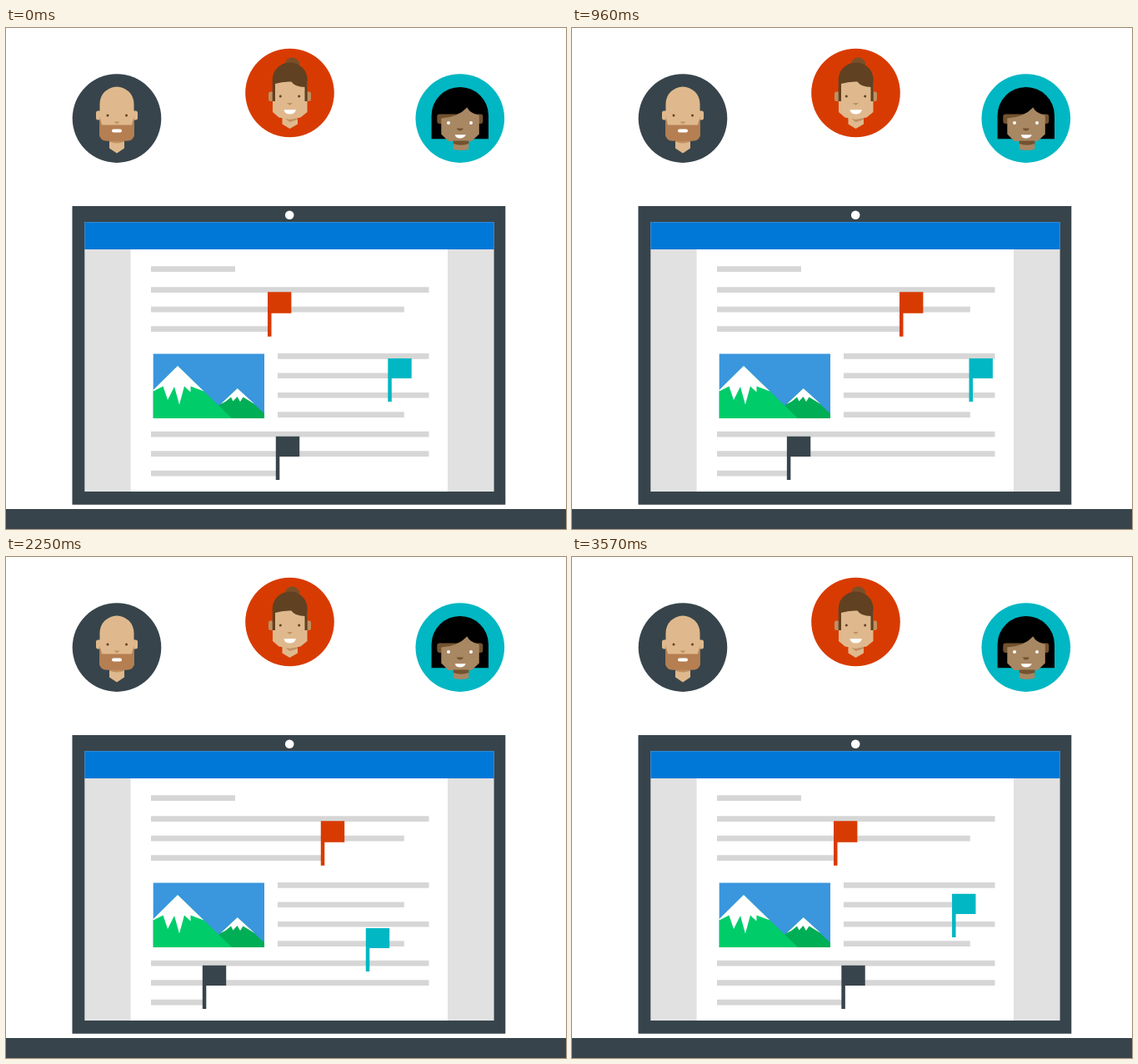
An HTML page for the animation above (3.6 s loop, 672 by 602 pixels).

```html
<!DOCTYPE html>
<html lang="en">
<head>
<meta charset="utf-8">
<title>Shared document</title>
<style>
  html, body { margin: 0; width: 100%; height: 100%; overflow: hidden; background: #fff; }
  svg { display: block; }
  .slate { fill: #37444b; }
  .red { fill: #d83b01; }
  .teal { fill: #00b7c3; }
  .skin { fill: #dfb98d; }
  .tan { fill: #c09060; }
  .brown { fill: #604122; }
  .dusk { fill: #a88763; }
  .umber { fill: #73532f; }
  .white { fill: #fff; }
</style>
</head>
<body>
<svg width="672" height="602" viewBox="0 0 672 602">
  <!-- bearded man -->
  <g transform="translate(133 108.6)">
    <circle class="slate" r="53.3"/>
    <rect class="skin" x="-25" y="-9" width="50" height="11" rx="2.5"/>
    <path class="skin" d="M-9 20H9V36L0 42L-9 36ZM-20.5 22V-17.5a20.5 20.5 0 0 1 41 0V22Z"/>
    <path class="tan" d="M-9 26H9V28Q0 32 -9 28Z"/>
    <path fill="#b57f52" d="M-20.5 -2L-18 8H18L20.5 -2V20Q20 27 12 27.2H-12Q-20 27 -20.5 20Z"/>
    <path class="tan" d="M-3.5 4H3.5L0 7Z"/>
    <rect class="white" x="-6" y="13" width="12" height="4" rx="2"/>
    <g class="brown"><circle cx="-11" cy="-3.6" r="1.5"/><circle cx="11.5" cy="-3.6" r="1.5"/></g>
  </g>
  <!-- woman with a bun -->
  <g transform="translate(340.5 78)">
    <circle class="red" r="53.3"/>
    <circle fill="#7a4f28" cx="3" cy="-34" r="8.7"/>
    <rect class="tan" x="-25.5" y="-1.5" width="51" height="11.5" rx="2.5"/>
    <path class="skin" d="M-9 26H9.5V37.5L0 43L-9 37.5Z"/>
    <path class="tan" d="M-9 28H9.5V32L0 35Z"/>
    <path class="skin" d="M-20.5 -14H21V23L13 29.5L0 32L-13 29.5L-20.5 23Z"/>
    <path class="brown" d="M-20.8 10V-16a21 20.5 0 0 1 42 0V10H18V-7Q6 -7 2 -13.5Q-8 -14 -17.5 -11V10Z"/>
    <path class="tan" d="M-3.5 12H3.5L0 15Z"/>
    <path class="white" d="M-7 20.3H7.5Q6 25.5 0 25.5T-7 20.3Z"/>
    <g class="brown"><circle cx="-11.2" cy="4" r="1.5"/><circle cx="11.2" cy="4" r="1.5"/></g>
  </g>
  <!-- woman with a bob -->
  <g transform="translate(544.8 108.6)">
    <circle class="teal" r="53.3"/>
    <path d="M-34.2 24.7V-3.4a34.2 34.2 0 0 1 68.4 0V24.7Z"/>
    <rect class="umber" x="-27.5" y="-5" width="55" height="11.5" rx="3"/>
    <path class="dusk" d="M-8 23H10.5V37Q1 40 -8 37ZM-22.5 0Q-3 -1 8.5 -13Q12 -6 23 -3.5V19L14 27.4H-14L-22.5 19Z"/>
    <path class="umber" d="M-8 27H10.5V30.5Q1 34 -8 30.5ZM-4 12H4Q3 15 0 15T-4 12Z"/>
    <path class="white" d="M-6 19.7H7Q5 24 0 24T-6 19.7Z"/>
    <g class="white"><circle cx="-13.8" cy="5.4" r="2"/><circle cx="13.2" cy="5.4" r="2"/></g>
  </g>
  <!-- laptop and page -->
  <path class="slate" d="M79.5 214H599.3V572.8H79.5ZM0 578H672V602H0Z"/>
  <circle class="white" cx="340.2" cy="224.7" r="5.3"/>
  <path fill="#e1e1e1" d="M94.3 233.3H585.6V557H94.3Z"/>
  <path class="white" d="M149.6 266H530V557H149.6Z"/>
  <path fill="#0078d7" d="M94.3 233.3H585.6V266H94.3Z"/>
  <path id="lines" stroke="#d6d6d6" stroke-width="6.7"/>
  <!-- picture -->
  <path fill="#3a96dd" d="M176.7 391.5H310V469H176.7Z"/>
  <path fill="#00ae56" d="M254 455L277.7 433L310 463.5V469H254Z"/>
  <path class="white" d="M277.7 433L257.5 452L264 448.5L270 443.5L272.5 448.5L277.5 443L281 449L284.5 443.5L298.5 452Z"/>
  <path fill="#00cc6a" d="M176.7 436L206 406L237 436L271 469H176.7Z"/>
  <path class="white" d="M176.7 435L206 406L237.5 436.5L221.5 430.5V437.5L214 430.5L208 452.5L202 431L194 447L188.5 430.5L176.7 436.5Z"/>
  <g id="flags"></g>
</svg>
<script>
  const LOOP = 3600, STEP = 30, LINE_GAP = 23.47;

  // Each move: [start ms, end ms, dx, dy]
  const flags = {
    red: { x: 314, y: 317.3, moves: [[0, 420, 27], [540, 930, 52], [1380, 1620, 13.6], [2110, 2560, -92.6]] },
    teal: { x: 458.3, y: 397, moves: [[120, 450, 18.2], [1090, 1230, -17.5], [1400, 1750, 17.5],
      [1920, 2115, -44.7, 49], [2520, 2730, 12.4], [3412, LOOP, 14.1, -49]] },
    slate: { x: 323.8, y: 490.8, moves: [[600, 1146, -100], [1470, 1770, 12], [2255, 2540, 52], [3026, 3577, 36]] }
  };

  for (const [name, flag] of Object.entries(flags)) {
    const height = name === 'red' ? 25.4 : 24.1;
    flag.node = document.createElementNS('http://www.w3.org/2000/svg', 'path');
    flag.node.setAttribute('class', name);
    flag.node.setAttribute('d', `M0 0H28.4V${height}H4.5V${height + 28}H0Z`);
    document.getElementById('flags').append(flag.node);
  }

  function positionAt({ x, y, moves }, t) {
    for (const [start, end, dx, dy = 0] of moves) {
      const k = Math.min(1, Math.max(0, (t - start) / (end - start)));
      x += dx * k;
      y += dy * k;
    }
    return [x, y];
  }

  const paragraph = (left, top, ends) =>
    ends.map((end, i) => `M${left} ${top + i * LINE_GAP}H${end}`).join('');

  function draw() {
    const t = Math.floor(performance.now() % LOOP / STEP) * STEP;
    const lineEnd = {};
    for (const [name, flag] of Object.entries(flags)) {
      const [x, y] = positionAt(flag, t);
      lineEnd[name] = x + 1;
      flag.node.setAttribute('transform', `translate(${x} ${y})`);
    }
    document.getElementById('lines').setAttribute('d',
      paragraph(174, 289.7, [275]) +
      paragraph(174, 314.7, [507.5, 477.8, lineEnd.red]) +
      paragraph(326, 394.3, [507.5, 477.8, 507.5, 477.8]) +
      paragraph(174, 488.2, [507.5, 507.5, lineEnd.slate]));
    requestAnimationFrame(draw);
  }
  draw();
</script>
</body>
</html>
```
